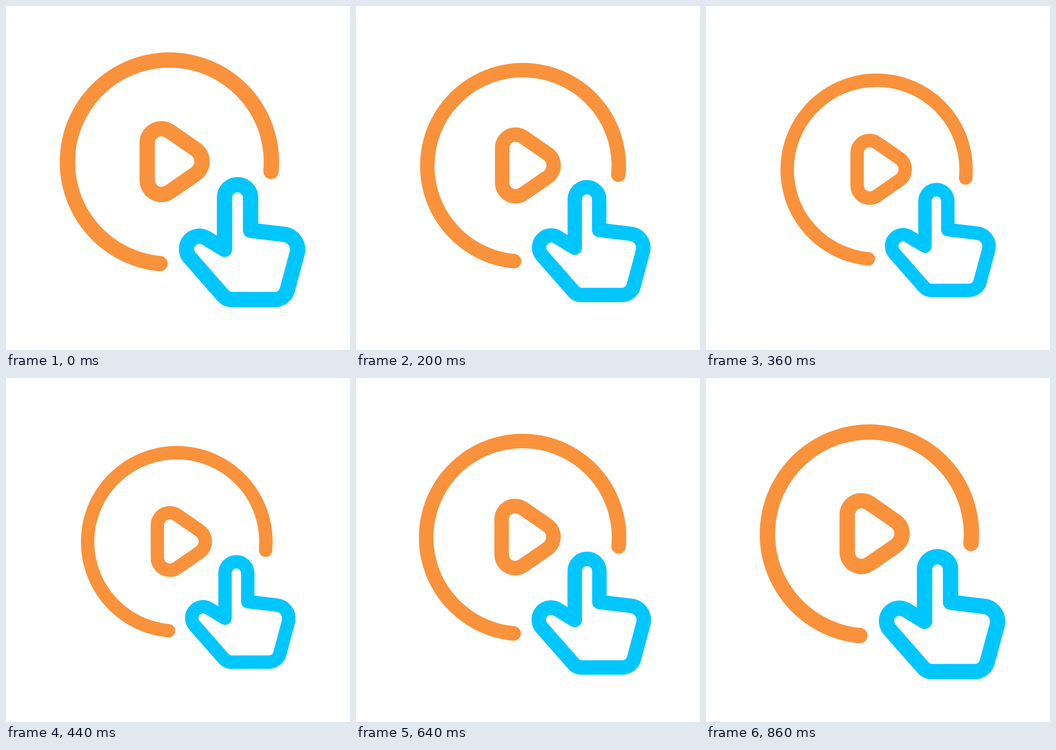
An HTML page with a canvas that plays this animation: 748x748 px, repeating every 3000 ms.

```html
<!DOCTYPE html>
<html lang="en">
<head>
<meta charset="utf-8">
<title>Tap to play</title>
<style>
  html, body { margin: 0; width: 100%; height: 100%; overflow: hidden; background: #fff; }
  canvas { display: block; }
</style>
</head>
<body>
<canvas id="stage" width="748" height="748"></canvas>
<script>
const ctx = document.getElementById('stage').getContext('2d');
const SIZE = 748, LOOP = 3000, STEP = 20;
const PIVOT = { x: 483, y: 475 };
const ORANGE = '#fa923c', BLUE = '#00c6ff';

const disc = (x, y, r = 0) => ({ x, y, r });

// A bend from flat to slope 1 at x = 0, rounded over -w..w.
function bend(x, w) {
  if (x <= -w) return 0;
  return x >= w ? x : (x + w) ** 2 / (4 * w);
}

// Shrinks at a steady pace, springs back, then settles softly.
function scaleAt(t) {
  const press = 0.384, release = 0.356;
  const begin = 40, end = 793;
  const turn = (press * begin + release * end) / (press + release);
  const dip = press * bend(t - begin, 20)
            - (press + release) * bend(t - turn, 20)
            + release * bend(t - end, 62);
  return 1 - dip / 1000;
}

// Direction in which the shared tangent of two discs touches them.
function tangent(a, b) {
  const dx = b.x - a.x, dy = b.y - a.y;
  return Math.atan2(dy, dx) - Math.acos((a.r - b.r) / Math.hypot(dx, dy));
}

// A band wrapped clockwise around discs; a disc of radius 0 is a sharp point.
function wrap(discs, color) {
  const n = discs.length;
  ctx.beginPath();
  discs.forEach((d, i) => {
    const prev = discs[(i + n - 1) % n], next = discs[(i + 1) % n];
    ctx.arc(d.x, d.y, d.r, tangent(prev, d), tangent(d, next));
  });
  ctx.closePath();
  ctx.strokeStyle = color;
  ctx.stroke();
}

function drawRing() {
  const gap = 0.093;
  ctx.beginPath();
  ctx.arc(355.3, 339.3, 221.8, Math.PI / 2 + gap, gap);
  ctx.strokeStyle = ORANGE;
  ctx.stroke();
}

function drawPlay() {
  const x = 338, y = 338.3, half = 40.5;
  wrap([disc(x, y - half, 31), disc(x + 55.2, y, 33), disc(x, y + half, 31)], ORANGE);
}

function drawHand() {
  const base = 638.4;
  const thumb = disc(420.5, 528.5, 28);
  const crook = disc(475.2, 529);
  const fingertip = disc(503.5, 416.9, 28.3);
  const notch = disc(531.8, 487.8);
  const knuckle = disc(601, 529.4, 33);
  const heel = disc(584.5, base - 28, 28);
  const wrist = disc(491, base - 25, 25);
  wrap([thumb, crook, fingertip, notch, knuckle, heel, wrist], BLUE);
}

function draw(t) {
  const s = scaleAt(t);
  ctx.setTransform(1, 0, 0, 1, 0, 0);
  ctx.fillStyle = '#fff';
  ctx.fillRect(0, 0, SIZE, SIZE);
  ctx.translate(PIVOT.x, PIVOT.y);
  ctx.scale(s, s);
  ctx.translate(-PIVOT.x, -PIVOT.y);
  ctx.lineWidth = 33.3;
  ctx.lineCap = ctx.lineJoin = 'round';
  drawRing();
  drawPlay();
  drawHand();
}

const start = performance.now();
function tick() {
  const t = (performance.now() - start) % LOOP;
  draw(Math.floor(t / STEP) * STEP);
  requestAnimationFrame(tick);
}
tick();
</script>
</body>
</html>
```
